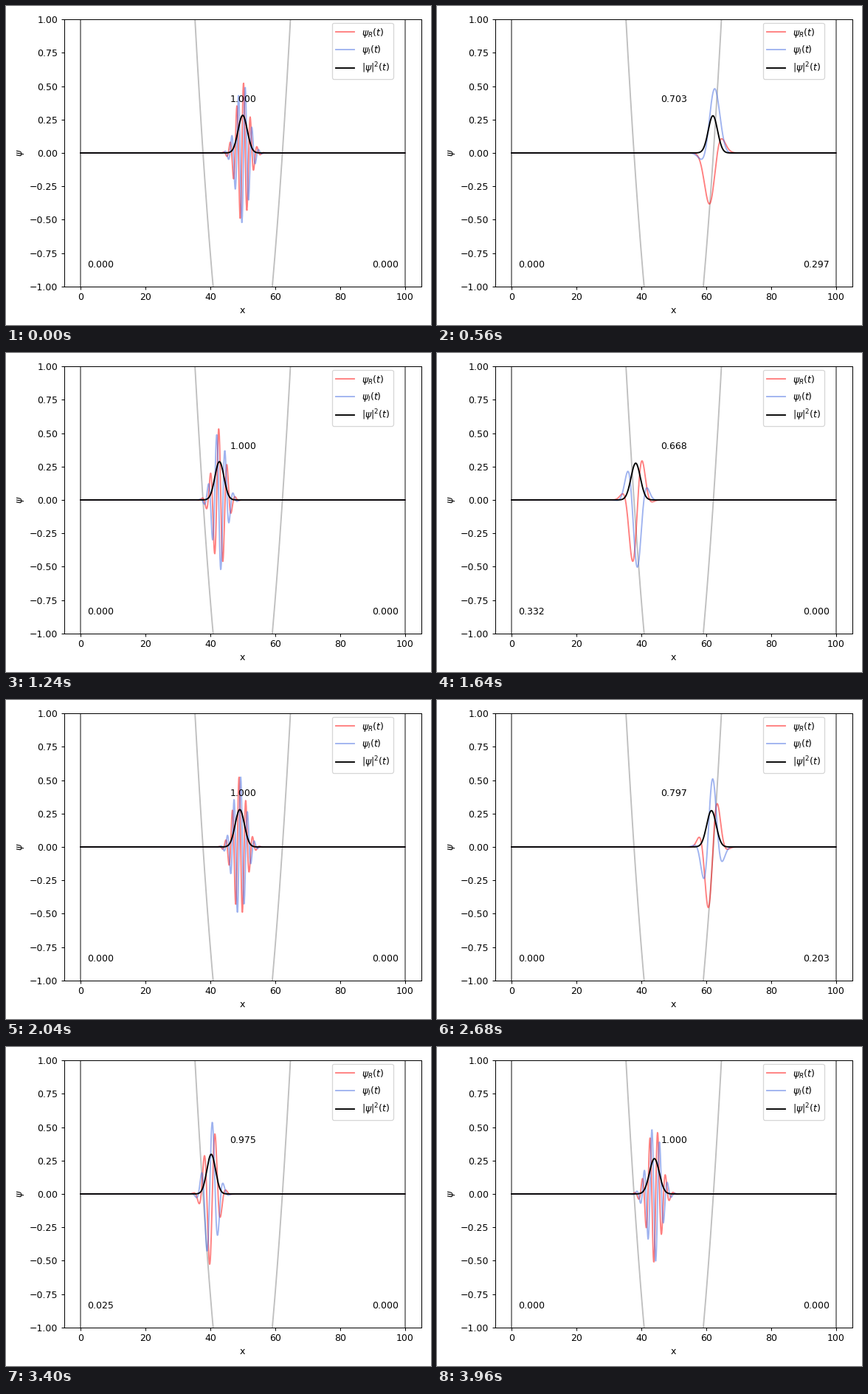
A matplotlib script for the animation above (4 s loop, 576 px wide and 432 px high).

```python
import numpy as np
import matplotlib.pyplot as plt
from matplotlib.animation import FuncAnimation

FRAMES, STEP_MS = 100, 40
W, H = 576, 432
DT = 0.5                      # physical time per frame
DX, X0, K0, WIDTH = 0.1, 50, 3, 2
LEFT, RIGHT = 37.65, 62.85    # borders of the three probability regions

# Harmonic well on a finite-difference grid (hbar = m = 1)
x = np.arange(0, 100 + DX / 2, DX)
well = 0.03 * (x - X0) ** 2
hop = np.full(x.size - 1, -0.5 / DX**2)
hamilton = np.diag(well + 1 / DX**2) + np.diag(hop, 1) + np.diag(hop, -1)
energy, modes = np.linalg.eigh(hamilton)

packet = np.exp(-(x - X0) ** 2 / (2 * WIDTH**2) + 1j * K0 * x)
packet /= np.sqrt(np.sum(abs(packet) ** 2) * DX)
weights = modes.T @ packet


def psi_at(t):
    return modes @ (weights * np.exp(-1j * energy * t))


plt.rcParams.update({"font.family": "DejaVu Sans", "font.size": 10})
fig, ax = plt.subplots(figsize=(W / 90, H / 90), dpi=90)
fig.subplots_adjust(left=79.1 / W, right=562.5 / W,
                    bottom=1 - 379.7 / H, top=1 - 18.3 / H)
ax.set_xlim(-5, 105)
ax.set_ylim(-1, 1)
ax.set_xlabel("x")
ax.set_ylabel(r"$\psi$")

for wall in (0, 100):
    ax.axvline(wall, color="gray", lw=1.5)
ax.plot(x, (well - K0**2 / 2) / 2, color="gray", alpha=0.5)
real, = ax.plot([], [], color="red", alpha=0.5, label=r"$\psi_R(t)$")
imag, = ax.plot([], [], color="royalblue", alpha=0.5, label=r"$\psi_I(t)$")
dens, = ax.plot([], [], color="black", label=r"$|\psi|^2(t)$")
ax.legend(loc=(0.75, 0.777))

labels = [ax.text(*pos, "") for pos in ((2, -0.86), (46, 0.38), (90, -0.86))]
regions = [x < LEFT, (x >= LEFT) & (x <= RIGHT), x > RIGHT]


def update(i):
    psi = psi_at(i * DT)
    prob = abs(psi) ** 2
    real.set_data(x, psi.real)
    imag.set_data(x, psi.imag)
    dens.set_data(x, prob)
    for label, region in zip(labels, regions):
        label.set_text(f"{prob[region].sum() * DX:.3f}")
    return [real, imag, dens, *labels]


anim = FuncAnimation(fig, update, frames=FRAMES, interval=STEP_MS,
                     repeat=True, repeat_delay=0)
plt.show()
```
